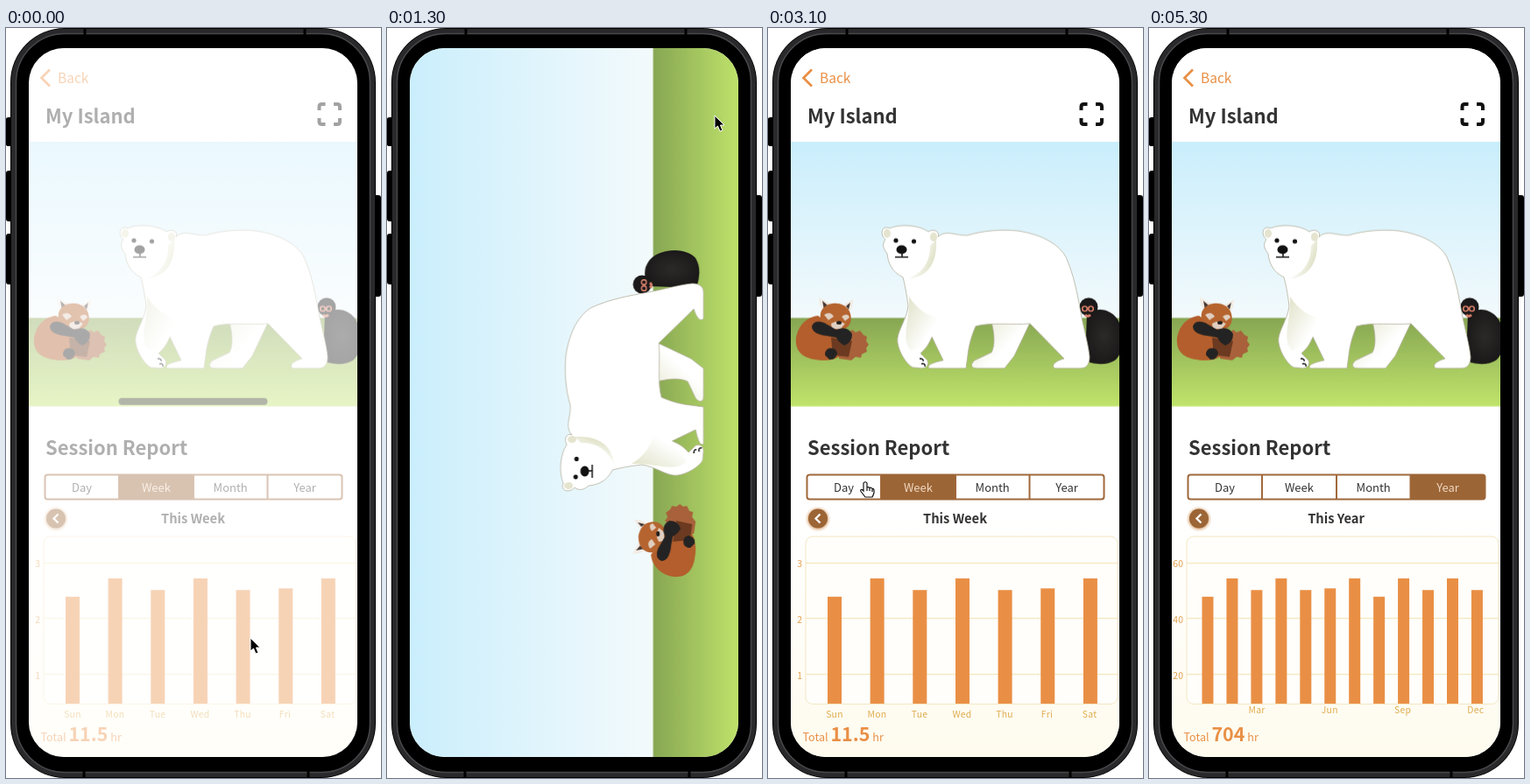
Recreate the animation shown at these times as an HTML page. Size 428 px wide and 857 px high, loop 7.3 s.

```html
<!DOCTYPE html>
<html lang="en">
<head>
<meta charset="utf-8">
<title>My Island</title>
<style>
  html, body { margin: 0; width: 100%; height: 100%; overflow: hidden; background: #fff; }
  svg, #screen { position: absolute; left: 0; top: 0; width: 428px; height: 857px; }
  #screen {
    clip-path: inset(23px 27px 24px 26px round 40px);
    background: linear-gradient(#fff 560px, #fefbee 835px);
  }
  #header { z-index: 1; }
  #scene { z-index: 2; }
  text { font-family: "Noto Sans CJK SC", "Noto Sans CJK JP", "Noto Sans CJK", "Noto Sans", sans-serif; }
  .title { font-size: 22px; font-weight: 700; fill: #333; }
  .tab { font-size: 13px; fill: #333; text-anchor: middle; }
  .period { font-size: 14.7px; font-weight: 700; fill: #333; text-anchor: middle; }
  .axis { font-size: 10.5px; fill: #e3a04f; text-anchor: end; }
  .label { font-size: 10.4px; font-weight: 300; letter-spacing: .3px; fill: #dfac4e; text-anchor: middle; }
  .total { font-size: 12.6px; font-weight: 500; fill: #e98f45; }
  .total tspan { font-size: 21.5px; font-weight: 700; }
</style>
</head>
<body>
<svg viewBox="0 0 428 857">
  <path d="M0 104q0-2 3-2h5v33H3q-3 0-3-2zM0 166q0-3 3-3h5v58H3q-3 0-3-3zM0 238q0-3 3-3h5v58H3q-3 0-3-3zM420 191h5q3 0 3 3v110q0 3-3 3h-5z"/>
  <rect x="5" y="0" width="417" height="857" rx="62"/>
  <rect x="9" y="4" width="409" height="849" rx="58" fill="none" stroke="#29292b" stroke-width="6"/>
  <rect x="11.500" y="6.500" width="404" height="844" rx="55.500" fill="none" stroke="#48484b" stroke-width="1.500"/>
  <path d="M90 1v9M341 1v9M89 848v9M345 848v9" stroke="#000" stroke-width="3"/>
  <rect x="26" y="23" width="375" height="810" rx="40" fill="#fff"/>
</svg>

<div id="screen">
  <svg id="header" viewBox="0 0 428 857">
    <path d="M50 47.5L40.5 57l9.500 9.500" fill="none" stroke="#e98f45" stroke-width="2.700"/>
    <text x="59" y="63" font-size="15.500" fill="#e98f45">Back</text>
    <text class="title" x="45" y="109">My Island</text>
    <path d="M357.500 94v-4q0-3 3-3h4M374 87h4q3 0 3 3v4M381 103v4q0 3-3 3h-4M364.500 110h-4q-3 0-3-3v-4" fill="none" stroke="#111" stroke-width="4"/>
  </svg>

  <svg id="scene" viewBox="0 0 428 857">
    <defs>
      <linearGradient id="sky" x2="0" y2="1"><stop stop-color="#caeefc"/><stop offset="1" stop-color="#f3fafc"/></linearGradient>
      <linearGradient id="grass" x2="0" y2="1"><stop stop-color="#87a653"/><stop offset="1" stop-color="#c0e46b"/></linearGradient>
      <linearGradient id="hind" x2=".8" y2=".6"><stop stop-color="#e4e5cd"/><stop offset=".8" stop-color="#fff"/></linearGradient>
      <linearGradient id="shade" x2="1" y2=".5"><stop stop-color="#fff" stop-opacity="0"/><stop offset="1" stop-color="#dcdec0"/></linearGradient>
      <linearGradient id="chest" x2="1" y2="1"><stop stop-color="#dfe1c6"/><stop offset=".7" stop-color="#fff"/></linearGradient>
      <radialGradient id="fur"><stop stop-color="#2c2929"/><stop offset="1" stop-color="#1b1919"/></radialGradient>
    </defs>
    <g id="world">
      <rect class="wide" id="air" y="130" height="202" fill="url(#sky)"/>
      <rect class="wide" y="331.500" height="101" fill="url(#grass)"/>
      <rect id="indicator" y="423" height="8" rx="4"/>

      <g id="monkey">
        <path d="M364 326C378 318 393 322 400 335C408 351 406 371 396 380C387 386 370 385 362 380Z" fill="url(#fur)"/>
        <circle cx="366" cy="319" r="10.500" fill="#1b1919"/>
        <g fill="none" stroke="#d9806a" stroke-width="1.600">
          <circle cx="361.500" cy="321" r="2.800"/><circle cx="368.500" cy="321" r="2.800"/>
          <path d="M362 328q3 3 6 0" stroke-width="3"/>
        </g>
      </g>

      <g id="bear" stroke="#b4b09e" stroke-width=".8">
        <path d="M255 336C259 351 259 364 255 371L236 380C231 384 231 389 238 389H270L281 375L299 337Z" fill="url(#hind)"/>
        <path d="M134 242C127 236 130 225 139 229C150 224 172 225 183 233C189 229 197 233 194 239C203 230 215 238 228 237C245 232 265 230 285 232C312 236 332 247 340 262C349 282 353 303 357 326C361 346 366 364 367 376C367 385 363 389 357 389H327C323 385 328 381 338 378L299 338C280 340 255 336 237 341C232 352 229 364 228 374L226 389H184C181 386 186 383 200 380L187 353C184 361 180 367 174 372L182 380C184 386 180 389 175 389L165 388C158 384 150 372 148 360C146 348 158 335 160 318C158 302 156 293 154 285C141 279 137 268 136 258C131 252 130 247 134 242Z" fill="#fff"/>
        <g stroke="none">
          <path d="M192 242C193 263 187 284 160 287C178 279 185 267 185 249Z" fill="url(#shade)"/>
          <path d="M161 307C170 322 183 329 195 333L187 353C180 362 172 367 163 369C151 355 162 336 161 307Z" fill="url(#chest)"/>
          <ellipse cx="136" cy="235" rx="4" ry="5" fill="#e4e4cf"/>
          <ellipse cx="189" cy="239" rx="4" ry="5" fill="#e4e4cf"/>
        </g>
        <g fill="#111" stroke="none">
          <circle cx="146" cy="243" r="2.600"/><circle cx="166.500" cy="244" r="2.600"/>
          <ellipse cx="152.500" cy="253.500" rx="6" ry="5"/>
        </g>
        <path d="M153 258v4M145 262h15M173 378q5 0 4 3M175 384q5-1 4 3" fill="none" stroke="#111" stroke-width="1.500"/>
      </g>

      <g id="panda">
        <path d="M82 346l9 4 5-5 4 3 5-2 4 5 4 2-1 5 3 4-3 4 1 4-6 3-1 4-6-1-5 4-14-2Z" fill="#a8613a"/>
        <path d="M57 329C39 331 31 348 32 360C33 374 46 380 65 380C83 380 93 369 88 350Z" fill="#b35e2c"/>
        <path d="M72 354l24 4-4 18-18-2Z" fill="#6b3a20"/>
        <path d="M58 308l13 7-7 10q-6-7-6-17ZM97 310l-11 7 5 10q7-8 6-17Z" fill="#f2ece4"/>
        <path d="M62 312l6 5-4 5ZM94 314l-5 4 3 4Z" fill="#493b37"/>
        <path d="M60 326C64 312 86 311 93 324C98 336 92 346 78 346C66 346 58 338 60 326Z" fill="#b5642f"/>
        <path d="M64 328q7-5 11 2l-6 4ZM84 330q7-5 9 1l-5 4ZM72 338q7-5 16 0l-5 6H73Z" fill="#e0cfc0"/>
        <ellipse cx="81" cy="337" rx="3" ry="2" fill="#211e1d"/>
        <path d="M50 341Q53 333 64 337L78 345Q91 340 96 350Q96 360 87 363Q81 360 78 354L67 352Q50 350 50 341Z" fill="#242323"/>
        <path d="M65 374q0-8 7-8 6 0 7 6-2 8-9 7Z" fill="#242323"/>
      </g>
    </g>
  </svg>

  <svg id="report" viewBox="0 0 428 857">
    <defs>
      <radialGradient id="glow"><stop offset=".65" stop-color="#cf9a69"/><stop offset="1" stop-color="#f3dcc3" stop-opacity="0"/></radialGradient>
    </defs>
    <text class="title" x="45" y="488">Session Report</text>
    <rect x="44.500" y="510.500" width="339" height="28" rx="3" fill="#fff" stroke="#a0693c" stroke-width="2"/>
    <path d="M129 511v27M214 511v27M298.500 511v27" stroke="#a0693c" stroke-width="2"/>
    <circle cx="57" cy="561" r="15" fill="url(#glow)"/>
    <circle cx="57" cy="560.500" r="11" fill="#9c6536"/>
    <path d="M59.500 555.500l-5 5 5 5" fill="none" stroke="#fff" stroke-width="2.300"/>
    <rect x="43" y="581" width="356" height="191.500" rx="8" fill="#fffefb" stroke="#f3e6c2"/>
    <path d="M43 611.500h356M43 674.500h356M43 738.500h356" stroke="#f5e8c3" stroke-width="1.300"/>
    <g id="charts"></g>
  </svg>
</div>

<svg viewBox="0 0 428 857">
  <g id="cursor">
    <path id="arrow" d="M0 0V15L3.500 12 6 18 9 17 6.500 11H11Z" stroke="#fff"/>
    <path id="hand" d="M-2 1Q0-1.500 2 1V6Q3.500 5 5 6.500Q6.500 5.500 8 7.500Q10 7 10 9.500V12Q9.500 14 8 17H0L-5 10.500Q-6 8-3.500 8.500L-2 10ZM2 6v4M5 7v3M8 8v3" fill="#fff" stroke="#111" stroke-width="1.200"/>
  </g>
</svg>

<script>
const LOOP = 7300, TICK = 100;
const ENTER = 1000, FULL = 1300, LEAVE = 2200;
const $ = id => document.getElementById(id);
const px = n => n + 'px';
const ramp = (t, from, to) => Math.min(1, Math.max(0, (t - from) / (to - from)));
const smooth = u => u * u * (3 - 2 * u);
const within = (t, from, to) => Number(t >= from && t < to);

// Samples a rule for the style at each tick and holds it until the next one.
function play(el, styleAt) {
  const frames = [];
  for (let t = 0; t < LOOP; t += TICK) {
    frames.push({ ...styleAt(t), offset: t / LOOP, easing: 'steps(1, end)' });
  }
  frames.push({ ...styleAt(LOOP - TICK), offset: 1 });
  el.animate(frames, { duration: LOOP, iterations: Infinity });
}

// Charts
const levels = [2.4, 2.52, 2.55, 2.73];
const week = '0313123';
const names = (list, first, gap) => list.split(' ').map((s, i) => [s, first + i * gap]);
const periods = [
  { tab: 'Day', title: 'Today', total: '2.5', unit: 1, order: week, count: 4, first: 193, gap: 14.2, width: 7,
    labels: names('6 12 18', 132, 89), labelY: 783, from: 3300, to: 4300 },
  { tab: 'Week', title: 'This Week', total: '11.5', unit: 1, order: week, count: 7, first: 76, gap: 48.65, width: 16,
    labels: names('Sun Mon Tue Wed Thu Fri Sat', 76, 48.5), labelY: 787.5, from: 0, to: 3300 },
  { tab: 'Month', title: 'This Month', total: '24', unit: 1, order: '03131123320', count: 14, first: 54.5, gap: 8.55, width: 4.6,
    labels: names('5 10 15 20 25', 89, 65.7), labelY: 783, from: 4300, to: 4900 },
  { tab: 'Year', title: 'This Year', total: '704', unit: 20, order: week, count: 12, first: 67, gap: 27.95, width: 13,
    labels: names('Mar Jun Sep Dec', 123, 83.3), labelY: 783, from: 4900, to: LOOP },
];
const tabWidth = 84.8;
const tabX = i => 44.2 + i * tabWidth;
const tabText = (p, i, extra = '') =>
  `<text class="tab" x="${tabX(i + .5)}" y="529.5" ${extra}>${p.tab}</text>`;

function chart(p, i) {
  const bars = Array.from({ length: p.count }, (_, n) => {
    const y = 802 - 63.4 * levels[p.order[n % p.order.length]];
    return `<rect x="${p.first + n * p.gap - p.width / 2}" y="${y}" width="${p.width}" height="${772 - y}" fill="#e98f45"/>`;
  });
  const axis = [3, 2, 1].map((v, n) => `<text class="axis" x="39" y="${615.5 + n * 64}">${v * p.unit}</text>`);
  const labels = p.labels.map(([s, x]) => `<text class="label" x="${x}" y="${p.labelY}">${s}</text>`);
  return `<g>
    <rect x="${tabX(i)}" y="510" width="${tabWidth}" height="29" rx="2" fill="#9c6536"/>
    ${tabText(p, i, 'style="fill:#f0d9c2"')}
    <text class="period" x="213.5" y="566">${p.title}</text>
    ${bars.join('')}${axis.join('')}${labels.join('')}
    <text class="total" x="39.5" y="815">Total <tspan>${p.total}</tspan> hr</text></g>`;
}

$('charts').innerHTML = periods.map((p, i) => tabText(p, i)).join('') + periods.map(chart).join('');
const groups = $('charts').querySelectorAll(':scope > g');
periods.forEach((p, i) => play(groups[i], t => ({ opacity: within(t, p.from, p.to) })));

// Turning to full screen and back
const entering = t => ramp(t, ENTER, FULL);
const settle = (t, time) => Math.exp((LEAVE - t) / time);
const turn = t => t <= LEAVE ? entering(t) ** .98 : settle(t, 52);
const grow = t => t <= LEAVE ? 1 - (1 - entering(t)) ** 1.83 : settle(t, 47);
const isFull = t => within(t, ENTER + TICK, LEAVE + TICK);
const late = t => turn(t) ** 6;
const left = t => 26 - 201 * late(t);
const width = t => 375 + 436 * grow(t);
const height = t => 302.5 + 80 * grow(t);

play($('world'), t => {
  const pivotX = 213.5 + 208 * turn(t) - 190.5 * late(t);
  const pivotY = 432.5 - height(t) / 2;
  const y = 281 + 147 * grow(t);
  return { transform: `translate(213.5px, ${y}px) rotate(${-90 * turn(t)}deg) translate(${-pivotX}px, ${-pivotY}px)` };
});
document.querySelectorAll('.wide').forEach(el =>
  play(el, t => ({ x: px(left(t)), width: px(width(t)) })));
play($('air'), t => ({ y: px(432.5 - height(t)), height: px(height(t) - 100.5) }));
play($('indicator'), t => {
  const w = 170 + 370 * grow(t);
  return {
    x: px(left(t) + (width(t) - w) / 2),
    width: px(w),
    opacity: t <= LEAVE ? .7 * (1 - ramp(t, 0, 500)) : .53 * (1 - ramp(t, 2500, 3000)),
  };
});
play($('report'), t => ({
  transform: `translateY(${70 * grow(t)}px)`,
  opacity: 1 - .75 * grow(t),
  zIndex: isFull(t) ? 1 : 3,
}));
play($('header'), t => ({ opacity: 1 - isFull(t) }));
play($('screen'), t => ({ opacity: .39 + .61 * ramp(t, 0, 500) }));

// Pointer: each move glides from the previous stop
const start = [279, 697];
const moves = [
  { from: 100, to: 900, stop: [374, 100] },
  { from: 2800, to: 3100, stop: [111, 519] },
  { from: 3600, to: 4100, stop: [263, 527] },
  { from: 4400, to: 4900, stop: [341, 525] },
];
play($('cursor'), t => {
  const [x, y] = moves.reduce((at, m) =>
    at.map((v, i) => v + (m.stop[i] - v) * smooth(ramp(t, m.from, m.to))), start);
  return { transform: `translate(${x}px, ${y}px)` };
});
const isHand = t => within(t, 900, FULL) || within(t, 3100, 5300);
play($('hand'), t => ({ opacity: isHand(t) }));
play($('arrow'), t => ({ opacity: within(t, 0, 3100) - within(t, 900, FULL) }));
</script>
</body>
</html>
```
